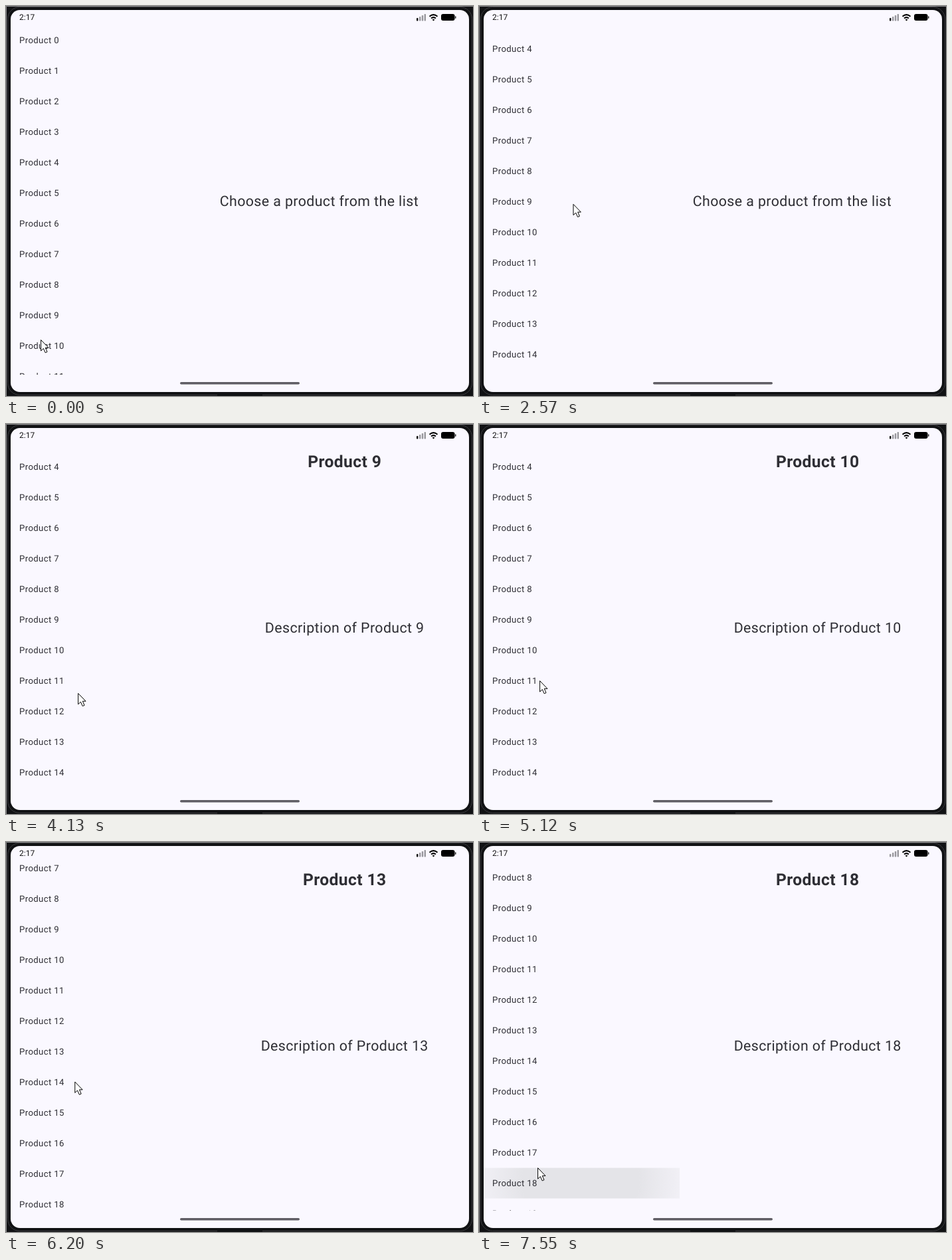
Recreate the animation shown at these times as an HTML page. Size 703 by 587 pixels, loop 8 s.

```html
<!DOCTYPE html>
<html lang="en">
<head>
<meta charset="utf-8">
<title>Product list and detail</title>
<style>
  html, body { margin: 0; width: 100%; height: 100%; overflow: hidden; background: #111; }
  svg { display: block; }
  text { font-family: Roboto, sans-serif; fill: #2e2e34; letter-spacing: .39px; text-rendering: geometricPrecision; }
  .item { font-size: 13.14px; }
  .body { font-size: 21.36px; text-anchor: middle; }
  .title { font-size: 24.64px; font-weight: 700; text-anchor: middle; }
  .clock { font-size: 12px; fill: #111; letter-spacing: 0; }
</style>
</head>
<body>
<svg width="703" height="587" viewBox="0 0 703 587">
  <defs>
    <clipPath id="listArea"><rect x="7" y="29" width="295" height="526"/></clipPath>
    <radialGradient id="glow" gradientUnits="userSpaceOnUse">
      <stop stop-color="#e4e4e8"/>
      <stop id="core" stop-color="#e4e4e8"/>
      <stop offset="1" stop-color="#e4e4e8" stop-opacity="0"/>
    </radialGradient>
  </defs>

  <!-- device -->
  <rect width="703" height="587" fill="#111214"/>
  <path d="M.5 587V.5H703" fill="none" stroke="#8a8a8c"/>
  <rect x="2.5" y="1.5" width="699" height="584" rx="18" fill="none" stroke="#3c3c3f"/>
  <path d="M318 585.5H386" stroke="#111214" stroke-width="2"/>
  <rect x="7" y="6" width="690" height="575" rx="14" fill="#faf8ff"/>
  <rect x="262" y="566" width="180" height="3.6" rx="1.8" fill="#605e65"/>

  <!-- status bar -->
  <text class="clock" x="20" y="21.3">2:17</text>
  <g fill="#98979c">
    <rect id="bar" x="618" y="18" width="2.4" height="4.5" rx=".8"/>
    <rect x="622" y="16" width="2.4" height="6.5" rx=".8"/>
    <rect x="625.8" y="14" width="2.4" height="8.5" rx=".8"/>
    <rect x="629.6" y="12" width="2.4" height="10.5" rx=".8"/>
  </g>
  <g fill="none" stroke="#000" stroke-width="2">
    <path d="M637.5 15.7Q643.5 10.6 649.5 15.7M640 18.6Q643.5 15.6 647 18.6"/>
    <path d="M643.5 22.4L641.6 20.4Q643.5 19 645.4 20.4Z" fill="#000" stroke="none"/>
  </g>
  <rect x="655" y="12" width="20.5" height="10" rx="3"/>
  <rect x="676.2" y="15.2" width="1.2" height="3.6" rx=".6"/>

  <g clip-path="url(#listArea)">
    <g id="list">
      <rect id="ripple" x="7" width="295" height="46" fill="url(#glow)"/>
    </g>
  </g>
  <text id="title" class="title" x="509.7" y="65.2"></text>
  <text id="body" class="body"></text>
  <path id="cursor" d="M.6.6V17L4.4 13.5L7.2 19.8L10 18.6L7.3 12.4H12Z" fill="#fff" stroke="#000" stroke-linejoin="round"/>
</svg>
<script>
const LOOP = 8000, LAST_CHANGE = 7550, STEP = 90, ROW = 46, LIST_TOP = 29, RIPPLE_TIME = 180;
const byId = id => document.getElementById(id);
const set = (el, attrs) => { for (const k in attrs) el.setAttribute(k, attrs[k]); };
const [list, ripple, glow, core, title, body, cursor, bar] =
  ['list', 'ripple', 'glow', 'core', 'title', 'body', 'cursor', 'bar'].map(byId);

// Pointer moves: start, end, x, y
const moves = [
  [0, 90, 204, 600], [1100, 1660, 126, 430],
  [1700, 2200, 142, 297],   // drag the list
  [2550, 2840, 98, 353], [2840, 3110, 86, 300],
  [3470, 3770, 145, 526], [3860, 4310, 88, 339],
  [4670, 4850, 91, 386], [5210, 5390, 91, 459], [5570, 5930, 94, 505],
  [5940, 6290, 105, 332],   // drag the list again
  [6300, 6560, 91, 399], [6740, 6830, 90, 432], [7090, 7190, 88, 490]
];
// Clicks: time, product
const clicks = [[3470, 9], [4580, 10], [5210, 11], [5760, 13], [6830, 16], [7460, 18]];

for (let i = 0; i < 22; i++) {
  const item = document.createElementNS('http://www.w3.org/2000/svg', 'text');
  set(item, { class: 'item', x: 20, y: LIST_TOP + ROW * i + 27.1 });
  item.textContent = 'Product ' + i;
  list.append(item);
}

function ease(t, start, end) {
  const p = Math.max(0, Math.min(1, (t - start) / (end - start)));
  return p * p * (3 - 2 * p);
}

function pointerAt(t) {
  let x = 52, y = 502;
  for (const [start, end, toX, toY] of moves) {
    const p = ease(t, start, end);
    x += (toX - x) * p;
    y += (toY - y) * p;
  }
  return [x, y];
}

// The screen refreshes in steps, restarting after each longer pause.
function stepped(t) {
  const start = [0, 1210, 2570, 3770].findLast(s => s <= t);
  return Math.min(LAST_CHANGE, start + Math.floor((t - start) / STEP) * STEP);
}

function drawRipple(product, age) {
  const top = LIST_TOP + ROW * product;
  set(ripple, { y: top, visibility: age < RIPPLE_TIME ? 'visible' : 'hidden' });
  set(glow, { cx: Math.min(154, 108 + age / 2), cy: top + 18, r: 68 + 1.4 * age });
  set(core, { offset: .6 - age / 600 });
}

function draw(t) {
  const offset = 171 * ease(t, 1700, 2200) + 195.5 * ease(t, 5940, 6290);
  set(list, { transform: `translate(0 ${-offset})` });
  set(cursor, { transform: `translate(${pointerAt(t)})` });
  set(bar, { fill: t < 7460 ? '#111' : '#98979c' });

  const [time, product] = clicks.findLast(c => c[0] <= t) ?? [-LOOP];
  const chosen = product !== undefined;
  title.textContent = chosen ? 'Product ' + product : '';
  body.textContent = chosen ? 'Description of Product ' + product : 'Choose a product from the list';
  set(body, chosen ? { x: 509.7, y: 314 } : { x: 471.4, y: 301 });
  drawRipple(product ?? 0, t - time);
}

const begin = performance.now();
function tick() {
  draw(stepped((performance.now() - begin) % LOOP));
  requestAnimationFrame(tick);
}
tick();
</script>
</body>
</html>
```
